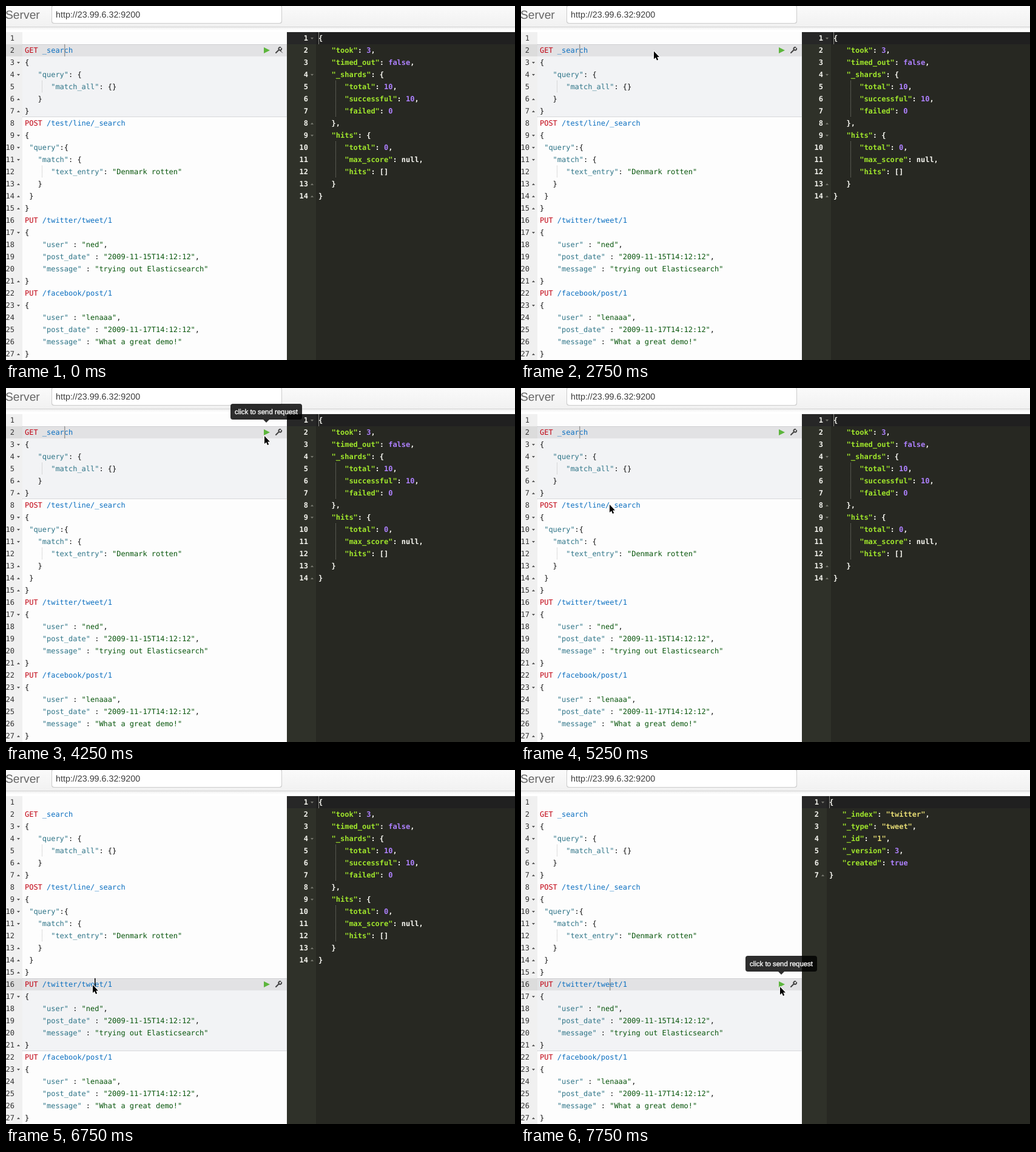
These frames come from a looping animation (839x583 px, 8000 ms). An HTML page with a canvas:

```html
<!DOCTYPE html>
<html lang="en">
<head>
<meta charset="utf-8">
<title>REST console</title>
<style>
html, body { margin: 0; width: 100%; height: 100%; overflow: hidden; }
canvas { display: block; }
</style>
</head>
<body>
<canvas id="stage" width="839" height="583"></canvas>
<script>
const canvas = document.getElementById('stage');
const ctx = canvas.getContext('2d');
const LOOP = 8000, TICK = 250, TOP = 43, ROW = 20, CHAR = 7.2, SPLIT = 463;
const WIDTH = canvas.width, HEIGHT = canvas.height;
const MONO = '12px "DejaVu Sans Mono", monospace';
const SANS = '"Liberation Sans", sans-serif';

const requests = `
GET _search
{
   "query": {
      "match_all": {}
   }
}
POST /test/line/_search
{
 "query":{
   "match": {
      "text_entry": "Denmark rotten"
   }
 }
}
PUT /twitter/tweet/1
{
    "user" : "ned",
    "post_date" : "2009-11-15T14:12:12",
    "message" : "trying out Elasticsearch"
}
PUT /facebook/post/1
{
    "user" : "lenaaa",
    "post_date" : "2009-11-17T14:12:12",
    "message" : "What a great demo!"
}`.split('\n');

const searchResult = `{
   "took": 3,
   "timed_out": false,
   "_shards": {
      "total": 10,
      "successful": 10,
      "failed": 0
   },
   "hits": {
      "total": 0,
      "max_score": null,
      "hits": []
   }
}`.split('\n');

const putResult = `{
   "_index": "twitter",
   "_type": "tweet",
   "_id": "1",
   "_version": 3,
   "created": true
}`.split('\n');

const light = {
  font: MONO, number: '#333', fold: '#555', guide: '#bbb',
  method: '#c00010', url: '#0b6fc0', key: '#2f7588', string: '#08560c', plain: '#111'
};
const dark = {
  font: 'bold ' + MONO, number: '#f4f4ee', fold: '#77786f', guide: '#85867c',
  key: '#a0e62c', string: '#e6db74', constant: '#ae81ff', plain: '#f8f8f2'
};
const TOKEN = new RegExp([
  '(?<method>GET|POST|PUT)', '(?<url>(?<=^[A-Z]+ ).+)', '(?<key>"[^"]*"(?= ?:))',
  '(?<string>"[^"]*")', '(?<constant>\\d+|true|false)', '(?<plain>[^\\s"\\d]+)'
].join('|'), 'g');

// Where the pointer rests or turns
const stops = [
  { t: 750, x: 557, y: 115 }, { t: 1500, x: 199, y: 63 }, { t: 1750, x: 199, y: 58 },
  { t: 2000, x: 233, y: 27 }, { t: 2500, x: 233, y: 27 }, { t: 3000, x: 205, y: 122 },
  { t: 3750, x: 426, y: 79 }, { t: 4500, x: 426, y: 79 }, { t: 5250, x: 146, y: 192 },
  { t: 5750, x: 110, y: 368 }, { t: 6750, x: 143, y: 354 }, { t: 7250, x: 427, y: 357 }
];

const rowTop = row => TOP + (row - 1) * ROW;
const smooth = k => k * k * (3 - 2 * k);

function pointerAt(t) {
  const i = stops.findLastIndex(stop => stop.t <= t);
  const a = stops[i], b = stops[i + 1];
  if (!a || !b) return a;
  const k = smooth((t - a.t) / (b.t - a.t));
  return { x: a.x + (b.x - a.x) * k, y: a.y + (b.y - a.y) * k };
}

function rect(color, x, y, w, h) {
  ctx.fillStyle = color;
  ctx.fillRect(x, y, w, h);
}

function roundBox(color, x, y, w, h) {
  ctx.beginPath();
  ctx.roundRect(x, y, w, h, 4);
  ctx.fillStyle = color;
  ctx.fill();
}

function fade(from, to, y1, y2) {
  const gradient = ctx.createLinearGradient(0, y1, 0, y2);
  gradient.addColorStop(0, from);
  gradient.addColorStop(1, to);
  rect(gradient, 0, y1, WIDTH, y2 - y1);
}

function text(str, x, y, color, font, align = 'left') {
  ctx.font = font;
  ctx.textAlign = align;
  ctx.fillStyle = color;
  ctx.fillText(str, x, y);
}

function polygon(color, x, y, points) {
  ctx.beginPath();
  for (const [dx, dy] of points) ctx.lineTo(x + dx, y + dy);
  ctx.closePath();
  ctx.fillStyle = color;
  ctx.fill();
}

// Triangle with its base centred on (x, y) and its tip `height` below
const wedge = (color, x, y, half, height) =>
  polygon(color, x, y, [[-half, 0], [half, 0], [0, height]]);

function dotted(color, x1, y1, x2, y2) {
  ctx.setLineDash([1, 1]);
  ctx.strokeStyle = color;
  ctx.lineWidth = 1;
  ctx.beginPath();
  ctx.moveTo(x1, y1);
  ctx.lineTo(x2, y2);
  ctx.stroke();
  ctx.setLineDash([]);
}

function drawLines(lines, left, theme) {
  ctx.font = theme.font;
  ctx.letterSpacing = '0px';
  ctx.letterSpacing = CHAR - ctx.measureText('0').width + 'px';
  lines.forEach((line, i) => {
    const y = rowTop(i + 1), code = line.trim();
    text(i + 1, left - 17, y + 14, theme.number, theme.font, 'right');
    if (code.endsWith('{')) wedge(theme.fold, left - 10.5, y + 9, 2.5, 3);
    if (code.startsWith('}')) wedge(theme.fold, left - 10.5, y + 12, 2.5, -3);
    if (line.startsWith('      ')) {
      const x = Math.floor(left + 4 * CHAR) + 0.5;
      dotted(theme.guide, x, y, x, y + ROW);
    }
    for (const match of line.matchAll(TOKEN)) {
      const kind = Object.keys(match.groups).find(name => match.groups[name]);
      text(match[0], left + match.index * CHAR, y + 14, theme[kind], theme.font);
    }
  });
  ctx.letterSpacing = '0px';
}

function drawHeader() {
  rect('#fff', 0, 0, WIDTH, TOP);
  fade('#fafafa', '#f1f1f1', 0, 34);
  rect('#d4d4d4', 0, 34, WIDTH, 1);
  fade('#efefef', '#fff', 35, 40);
  text('Server', -1, 21, '#666', '19.3px ' + SANS);
  roundBox('#ccc', 75, -2, 380, 31);
  roundBox('#fff', 76, -1, 378, 29);
  text('http://23.99.6.32:9200', 82, 19, '#3c3c3c', '14.3px ' + SANS);
}

function drawWrench(x, y) {
  ctx.strokeStyle = '#444';
  ctx.lineCap = 'round';
  ctx.lineWidth = 2;
  ctx.beginPath();
  ctx.moveTo(x - 4, y + 4);
  ctx.lineTo(x + 1, y - 1);
  ctx.arc(x + 2.8, y - 2.6, 2.4, 2.4, 5);
  ctx.moveTo(x + 1, y - 1);
  ctx.arc(x + 2.8, y - 2.6, 2.4, 2.4, -0.2, true);
  ctx.stroke();
  ctx.lineCap = 'butt';
}

function drawRequests(active, caretColumn, caretColor) {
  const y = rowTop(active);
  const bottom = rowTop(requests.indexOf('}', active) + 2);
  rect('#fdfdfd', 0, TOP, SPLIT, HEIGHT);
  rect('#f0f0f0', 0, TOP, 27, HEIGHT);
  rect('#f2f3f5', 27, y, SPLIT - 27, bottom - y);
  rect('#e2e2e4', 27, y, SPLIT - 27, ROW);
  rect('#dcdcdc', 0, y, 27, ROW);
  for (const edge of [y + 0.5, bottom - 0.5]) dotted('#bcbcc0', 27, edge, SPLIT, edge);
  drawLines(requests, 31, light);
  if (caretColor) rect(caretColor, Math.round(31 + caretColumn * CHAR), y, 1.5, ROW);
  polygon('#5cb53c', 425, y + 5, [[0, 0], [10, 5], [0, 10]]);
  drawWrench(449, y + 10);
}

function drawResponse(lines) {
  const digits = String(lines.length).length;
  const left = Math.round(500.6 + digits * CHAR), gutter = left - 4 - SPLIT;
  rect('#272822', SPLIT, TOP, WIDTH, HEIGHT);
  rect('#2f3129', SPLIT, TOP, gutter, HEIGHT);
  rect('#202020', SPLIT + gutter, TOP, WIDTH, ROW);
  rect('#272727', SPLIT, TOP, gutter, ROW);
  drawLines(lines, left, dark);
  rect('#8a8a85', left, TOP, 1, ROW);
}

function drawTooltip(row) {
  const y = rowTop(row) - 37, shade = 'rgba(0,0,0,0.82)';
  roundBox(shade, 370, y, 118, 26);
  wedge(shade, 429, y + 26, 5, 5);
  text('click to send request', 429, y + 17, '#fff', '11.4px ' + SANS, 'center');
  ctx.strokeStyle = '#fff';
  ctx.lineWidth = 0.35;
  ctx.strokeText('click to send request', 429, y + 17);
}

function drawPointer({ x, y }) {
  const arrow = [[0, 0], [0, 13], [3, 10.3], [5, 15], [7.2, 14], [5.2, 9.5], [9, 9.5]];
  ctx.lineJoin = 'round';
  ctx.strokeStyle = '#fff';
  ctx.lineWidth = 2;
  polygon('#000', x, y, arrow);
  ctx.stroke();
  ctx.fill();
}

function draw(now) {
  const t = Math.floor((now % LOOP) / TICK) * TICK;
  const within = (from, to) => t >= from && t < to;
  ctx.textRendering = 'geometricPrecision';
  drawHeader();

  if (t < 6500) drawRequests(2, 9, '#999');
  else drawRequests(16, 16, t < 7250 ? '#000' : t >= 7750 && '#999');

  drawResponse(t >= 7750 ? putResult : within(4000, 4250) ? [''] : searchResult);

  if (within(3750, 4750)) drawTooltip(2);
  if (t >= 7500) drawTooltip(16);

  const pointer = pointerAt(t);
  if (pointer) drawPointer(pointer);
}

function frame() {
  draw(performance.now());
  requestAnimationFrame(frame);
}
frame();
</script>
</body>
</html>
```
